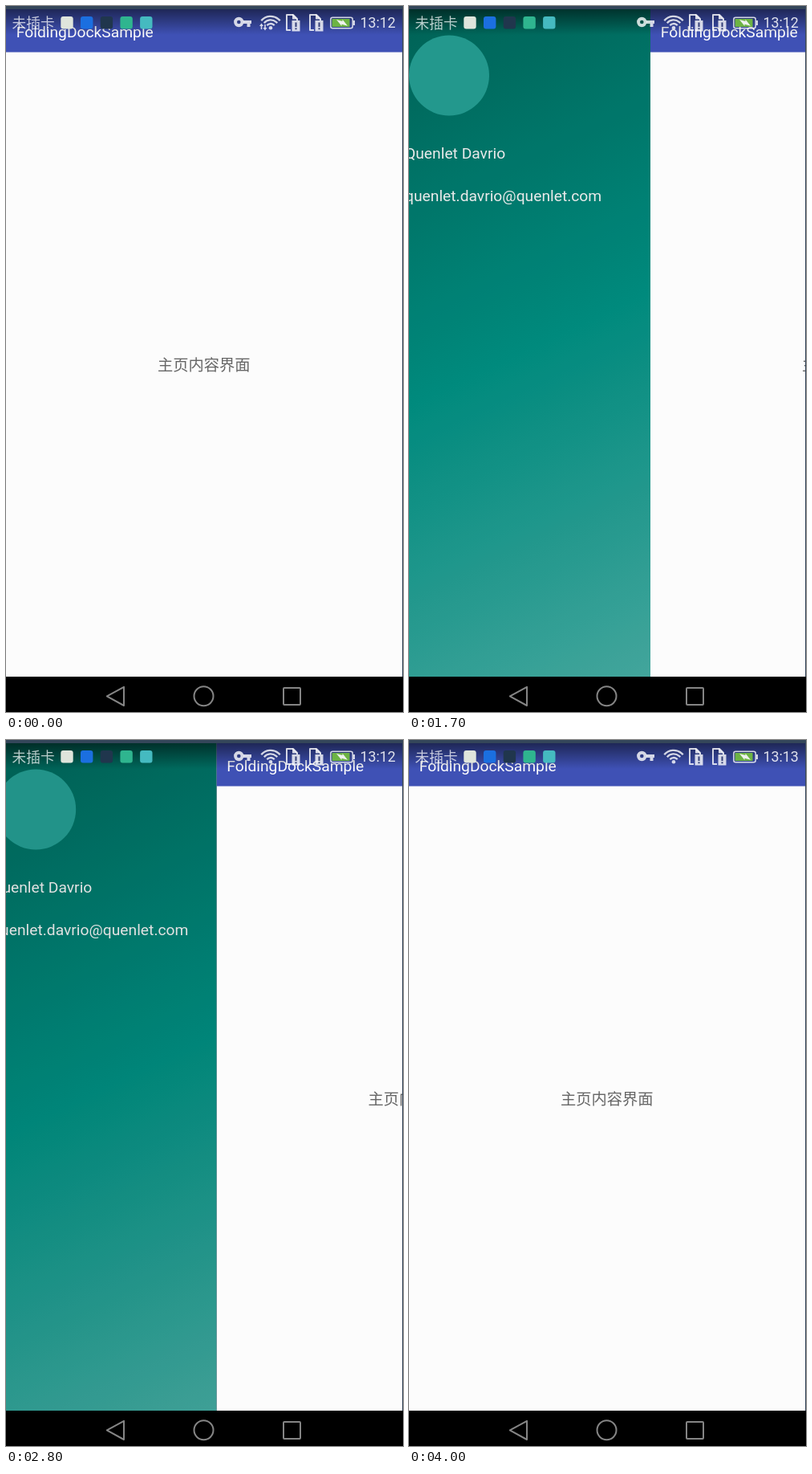
Animation of 495x879 px, one loop 4500 ms. Source, as an HTML page with a canvas:

```html
<!DOCTYPE html>
<html lang="zh">
<head>
<meta charset="utf-8">
<title>Sliding drawer</title>
<style>
  html, body { margin: 0; width: 100%; height: 100%; overflow: hidden; background: #000; }
  canvas { display: block; width: 495px; height: 879px; }
</style>
</head>
<body>
<canvas id="stage" width="495" height="879"></canvas>
<script>
const ctx = document.getElementById('stage').getContext('2d');
const LOOP = 4500, TOP = 4, BOTTOM = 835, RIGHT = 494;
const MENU = 391, FADE = 0.35;
const LATIN = 'Roboto, sans-serif';
const CJK = '"Noto Sans CJK SC", "Noto Sans CJK", sans-serif';
const ICON = 'rgba(255,255,255,0.8)';

// [time, drawer opening]: drag, fling open, drag back, fling shut
const PATH = [
  [900, 0], [1000, 9.3], [1200, 60], [1500, 179], [1600, 240], [1700, 301],
  [1800, 362], [1900, 391], [2500, 391], [2600, 360], [2700, 311], [2800, 262.5],
  [3000, 181], [3100, 120], [3200, 61.3], [3300, 18], [3400, 0]
];

function opening(ms) {
  const t = Math.floor(ms / 100) * 100;
  if (t <= PATH[0][0]) return 0;
  for (let i = 1; i < PATH.length; i++) {
    const [t0, x0] = PATH[i - 1], [t1, x1] = PATH[i];
    if (t <= t1) return x0 + (x1 - x0) * (t - t0) / (t1 - t0);
  }
  return 0;
}

function rect(x, y, w, h, fill) {
  ctx.fillStyle = fill;
  ctx.fillRect(x, y, w, h);
}

function text(str, x, y, size, color, family) {
  ctx.font = size + 'px ' + family;
  ctx.fillStyle = color;
  ctx.fillText(str, x, y);
}

function disc(x, y, r, fill) {
  ctx.fillStyle = fill;
  ctx.beginPath();
  ctx.arc(x, y, r, 0, Math.PI * 2);
  ctx.fill();
}

function poly(points) {
  ctx.beginPath();
  points.forEach(([x, y]) => ctx.lineTo(x, y));
  ctx.closePath();
}

function fillPoly(points, fill) {
  poly(points);
  ctx.fillStyle = fill;
  ctx.fill();
}

function roundRect(x, y, w, h, r) {
  ctx.beginPath();
  ctx.roundRect(x, y, w, h, r);
}

function drawMenu(x) {
  ctx.save();
  ctx.beginPath();
  ctx.rect(0, TOP, x, BOTTOM - TOP);
  ctx.clip();
  ctx.translate((x - MENU) / 3, 0);
  const g = ctx.createLinearGradient(MENU, BOTTOM, 0, TOP);
  g.addColorStop(0, '#4db6ac');
  g.addColorStop(0.5, '#009688');
  g.addColorStop(1, '#00695c');
  rect(0, TOP, MENU, BOTTOM - TOP, g);
  disc(80, 86.5, 50, '#26a69a');
  text('Quenlet Davrio', 25, 189.5, 19.25, '#fff', LATIN);
  text('quenlet.davrio@quenlet.com', 25, 243.3, 19.25, '#fff', LATIN);
  rect(0, TOP, MENU, BOTTOM - TOP, `rgba(0,0,0,${FADE * (1 - x / MENU)})`);
  ctx.restore();
}

function drawPage(x) {
  ctx.save();
  ctx.beginPath();
  ctx.rect(x, TOP, RIGHT - x, BOTTOM - TOP);
  ctx.clip();
  ctx.translate(x, 0);
  rect(0, TOP, RIGHT, BOTTOM - TOP, '#fcfcfc');
  rect(0, TOP, RIGHT, 53.5, '#3f51b5');
  text('FoldingDockSample', 12.8, 38.7, 19.25, '#fff', LATIN);
  text('主页内容界面', 188.9, 454.2, 19.25, '#666', CJK);
  ctx.restore();
}

function drawKey() {
  ctx.fillStyle = ICON;
  ctx.beginPath();
  ctx.arc(290.3, 20, 6.2, 0, Math.PI * 2);
  ctx.arc(290.3, 20, 2.3, 0, Math.PI * 2, true);
  ctx.fill();
  rect(296, 18, 10, 4, ICON);
  rect(300.5, 22, 4, 4, ICON);
}

function drawWifi(busy) {
  ctx.strokeStyle = ICON;
  ctx.lineWidth = 2.3;
  [6, 10.6, 15.2].forEach(r => {
    ctx.beginPath();
    ctx.arc(330, 28, r, -Math.PI * 0.78, -Math.PI * 0.22);
    ctx.stroke();
  });
  disc(330, 27.2, 2.3, ICON);
  if (busy) {
    fillPoly([[316, 25], [318.5, 21.5], [321, 25]], ICON);
    rect(317.7, 25, 1.6, 4, ICON);
    fillPoly([[320.5, 27], [325.5, 27], [323, 30.5]], ICON);
    rect(322.2, 23, 1.6, 4, ICON);
  }
}

function drawSim(x) {
  ctx.strokeStyle = ICON;
  ctx.lineWidth = 2;
  ctx.beginPath();
  [[6, 30], [1, 30], [1, 11], [9, 11], [14, 16], [14, 18]].forEach(([dx, y]) => ctx.lineTo(x + dx, y));
  ctx.stroke();
  fillPoly([[x + 8, 10], [x + 14.5, 16.5], [x + 8, 16.5]], ICON);
  rect(x + 7.5, 18, 10, 13.5, ICON);
  rect(x + 11.5, 20.5, 2, 5.5, '#333f78');
  rect(x + 11.5, 27.3, 2, 2, '#333f78');
}

function drawBattery() {
  roundRect(404.8, 14.2, 27.4, 13.6, 2.5);
  ctx.strokeStyle = ICON;
  ctx.lineWidth = 1.5;
  ctx.stroke();
  rect(433, 18, 2, 6, ICON);
  rect(406.5, 16, 22, 10, '#6db344');
  fillPoly([[412, 17], [419.5, 19], [419.5, 16.8], [426, 24.8], [418.5, 22.8], [418.5, 25]], '#eef2ee');
}

function drawStatus(ms) {
  const shade = ctx.createLinearGradient(0, TOP, 0, 36);
  shade.addColorStop(0, 'rgba(0,0,0,0.52)');
  shade.addColorStop(1, 'rgba(0,0,0,0)');
  rect(0, TOP, RIGHT, 32, shade);

  text('未插卡', 7.6, 27.6, 17.7, 'rgba(255,255,255,0.73)', CJK);
  ['#dfe5dc', '#1b6fe0', '#20364d', '#2fb58f', '#45bac0'].forEach((color, i) => {
    roundRect(68.3 + i * 24.7, 13, 15.4, 15.4, 3);
    ctx.fillStyle = color;
    ctx.fill();
  });

  drawKey();
  drawWifi(ms < 300);
  drawSim(349);
  drawSim(378);
  drawBattery();
  text(ms < 4000 ? '13:12' : '13:13', 441.5, 27.3, 17.8, 'rgba(255,255,255,0.85)', LATIN);
}

function drawNav() {
  rect(0, BOTTOM, 495, 879 - BOTTOM, '#000');
  ctx.strokeStyle = '#858585';
  ctx.lineWidth = 2;
  ctx.lineJoin = 'round';
  poly([[125.8, 859.4], [147, 847.8], [147, 871]]);
  ctx.stroke();
  ctx.beginPath();
  ctx.arc(246.5, 859.3, 12, 0, Math.PI * 2);
  ctx.stroke();
  roundRect(346, 849, 21, 21, 1);
  ctx.stroke();
}

function draw(now) {
  const ms = now % LOOP, x = opening(ms);
  rect(0, 0, 495, 879, '#34465a');
  drawMenu(x);
  drawPage(x);
  drawStatus(ms);
  drawNav();
}

let start;
function tick(now) {
  if (start === undefined) start = now;
  draw(now - start);
  requestAnimationFrame(tick);
}
draw(0);
requestAnimationFrame(tick);
</script>
</body>
</html>
```
